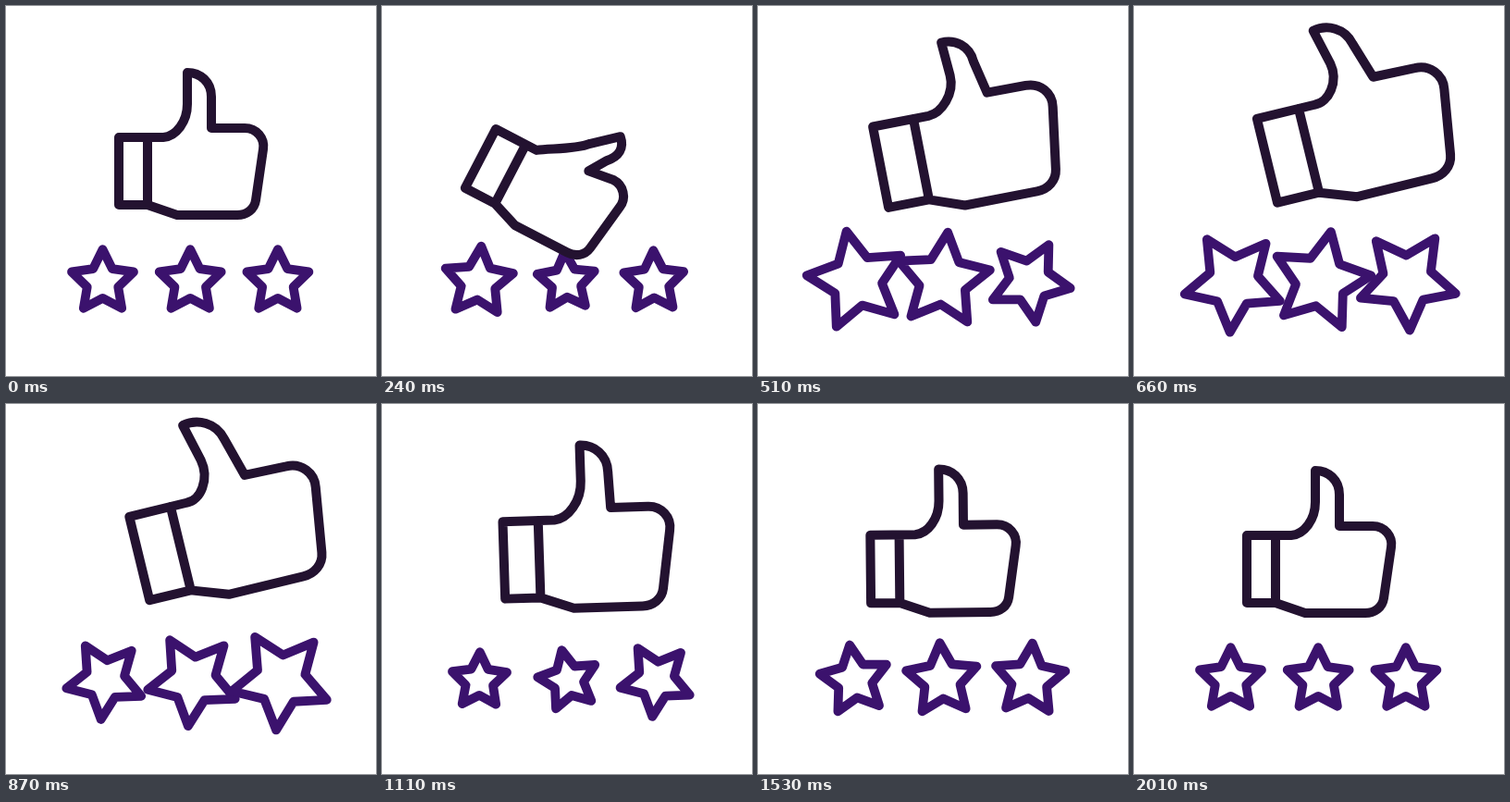
Recreate the animation shown at these times as an HTML page with a canvas. Size 400 by 400 pixels, loop 4040 ms.

```html
<!DOCTYPE html>
<html lang="en">
<head>
<meta charset="utf-8">
<title>Thumbs up and three stars</title>
<style>
  html, body { margin: 0; width: 100%; height: 100%; overflow: hidden; background: #fff; }
  canvas { display: block; width: 100vw; height: 100vh; }
</style>
</head>
<body>
<canvas id="stage" width="400" height="400"></canvas>
<script>
const ctx = document.getElementById("stage").getContext("2d");
const LOOP = 4040, STEP = 30, END = 2010;
const RAD = Math.PI / 180;

// Eases from value to value; each stop is [time, value]
function ease(t, ...stops) {
  let [from, value] = stops[0];
  for (const [to, next] of stops.slice(1)) {
    if (t <= from) break;
    const u = Math.min(1, (t - from) / (to - from));
    value += (next - value) * u * u * (3 - 2 * u);
    from = to;
  }
  return value;
}

// Builds a path in a moved, turned and scaled space, then strokes it unscaled
function outline(x, y, turn, scale, color, width, build) {
  ctx.save();
  ctx.translate(x, y);
  ctx.rotate(turn * RAD);
  ctx.scale(scale, scale);
  ctx.beginPath();
  build();
  ctx.restore();
  ctx.strokeStyle = color;
  ctx.lineWidth = width;
  ctx.stroke();
}

// Two half turns, each wound up first; size swells and springs back
function drawStar(x, t) {
  const turn = ease(t, [0, 0], [100, -3], [180, -3], [690, 186], [955, 186],
    [1240, 368], [1530, 352], [1810, 360]);
  const radius = ease(t, [0, 35.2], [100, 32], [490, 54.5], [640, 54.5],
    [1100, 31], [1380, 40.5], [1720, 35.2]);

  outline(x, 298.3, turn, radius, "#3b126d", 9.8, () => {
    for (let i = 0; i < 10; i++) {
      const r = i % 2 ? 0.5 : 1, a = (i * 36 - 90) * RAD;
      ctx.lineTo(r * Math.cos(a) - 0.034, r * Math.sin(a));
    }
    ctx.closePath();
  });
}

// The hand dips, swings up large, then settles
function drawHand(t) {
  const x = ease(t, [0, 200], [240, 188], [660, 232], [900, 232], [1400, 200]);
  const y = ease(t, [0, 149], [240, 174.6], [620, 107], [870, 107], [1280, 147.5], [1900, 149]);
  const turn = ease(t, [0, 0], [240, 27.5], [560, -13.7], [860, -13.7], [1150, -1.2], [1900, 0]);
  const scale = ease(t, [0, 1], [240, 0.985], [620, 1.28], [860, 1.275], [1360, 1.01], [1900, 1]);
  const stretch = ease(t, [0, 0], [240, 6], [860, 5], [1360, 0]);
  const bend = ease(t, [0, 0], [240, 43], [600, -12], [860, -12], [1110, 0]);
  const length = ease(t, [0, 1], [510, 0.89], [870, 0.975], [1110, 1]);

  const cuff = (px, py) => [px - 78, py - 7];
  const palm = (px, py) => cuff(px + stretch * 0.7, py);
  // Thumb points turn around the thumb's root
  const thumb = (px, py, share) => {
    const a = bend * share * RAD, c = Math.cos(a) * length, s = Math.sin(a) * length;
    return cuff(85 + stretch * 0.4 + px * c - py * s, px * s + py * c);
  };
  const move = p => ctx.moveTo(...p);
  const line = p => ctx.lineTo(...p);
  const curve = (a, b, c) => ctx.bezierCurveTo(...a, ...b, ...c);

  outline(x, y, turn, scale, "#231230", 10, () => {
    move(cuff(0, 0));
    line(cuff(48 + stretch * 0.4, 0));
    curve(cuff(62, -1 - bend * 0.18), thumb(-11, -17, 0.7), thumb(-11, -36, 0.85));
    line(thumb(-11, -70, 1));
    curve(thumb(3, -70, 1), thumb(15, -60, 0.9), thumb(15, -44, 0.85));
    line(cuff(100 + stretch + bend * 0.13, -10 + bend * 0.09));
    line(palm(136, -10));
    curve(palm(149, -10), palm(158, 1), palm(156, 13));
    line(palm(148, 68));
    curve(palm(146.5, 78), palm(138, 84), palm(128, 84));
    line(palm(63, 84));
    line(cuff(31 + stretch, 73));
    line(cuff(0, 73));
    ctx.closePath();
    move(cuff(31 + stretch, 0));
    line(cuff(31 + stretch, 73));
  });
}

function draw(now) {
  const t = Math.min(END, Math.floor((now % LOOP) / STEP) * STEP);
  ctx.fillStyle = "#fff";
  ctx.fillRect(0, 0, 400, 400);
  ctx.lineJoin = ctx.lineCap = "round";
  for (let i = 0; i < 3; i++) drawStar(105.7 + i * 94.7, t - i * 100);
  drawHand(t);
}

const start = performance.now();
function tick() {
  draw(performance.now() - start);
  requestAnimationFrame(tick);
}
tick();
</script>
</body>
</html>
```
